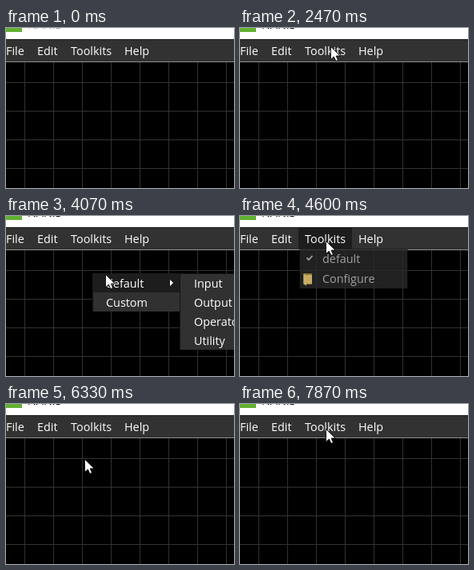
An HTML page with a canvas for the animation above (8.79 s loop, 285 by 201 pixels).

```html
<!DOCTYPE html>
<html lang="en">
<head>
<meta charset="utf-8">
<title>Toolkit menus</title>
<style>
html, body { margin: 0; width: 100%; height: 100%; overflow: hidden; background: #000; }
canvas { display: block; }
</style>
</head>
<body>
<canvas id="stage" width="285" height="201"></canvas>
<script>
const ctx = document.getElementById('stage').getContext('2d');
const LOOP = 8790, FPS = 15;   // all times below are ticks of 1/15 s
const PANEL = '#313131', DARK = '#1d1d1d', EDGE = '#141414';

const during = (n, spans) => spans.some(([from, to]) => n >= from && n < to);

// Each menu is shown during its open spans and fades in over about four ticks
const toolkits = {
  x: 74, y: 41, w: 136, rowH: 25, indent: 29,
  labels: ['default', 'Configure'],
  open: [[18, 37], [68, 81], [101, 118]],
  extra(n) {
    drawFolder();
    if (!during(n, [[78, 112]])) drawCheck();
  }
};
const context = {
  x: 108, y: 72, w: 112, rowH: 24, indent: 17,
  labels: ['default', 'Custom'],
  open: [[44, 67]],
  extra: () => shape([[205, 80], [209, 84], [205, 88]], '#fff')
};
const submenu = {
  ...context, x: 217, w: 80, indent: 18,
  labels: ['Input', 'Output', 'Operators', 'Utility'],
  open: [[54, 67]],
  extra: null
};
const shortContext = {
  ...context, x: 81, y: 85, w: 103,
  labels: ['Custom'],
  open: [[84, 95]],
  extra: null
};
const MENUS = [toolkits, context, submenu, shortContext];

const ENTRY = [251, 167], LABEL = [107, 31], DEFAULT_ROW = [107, 47];
const MOVES = [
  { from: 6, to: 11, at: [113, 23] },
  { from: 39, to: 43, at: [context.x, context.y] },
  { from: 47, to: 50, at: [128, 84] },
  { from: 60, to: 65, at: LABEL },
  { from: 70, to: 73, at: DEFAULT_ROW },
  { from: 78, to: 80, at: LABEL },
  { from: 81, to: 83, at: [81, 84] },
  { from: 87, to: 90, at: [94, 95] },
  { from: 93, to: 98, at: [103, 29] },
  { from: 105, to: 107, at: DEFAULT_ROW },
  { from: 112, to: 115, at: LABEL }
];

function pointerAt(n) {
  let pos = ENTRY;
  for (const { from, to, at } of MOVES) {
    const k = Math.min(1, Math.max(0, (n - from) / (to - from)));
    pos = pos.map((v, i) => v + (at[i] - v) * k);
  }
  return pos.map(Math.round);
}

function rect(x, y, w, h, color) {
  ctx.fillStyle = color;
  ctx.fillRect(x, y, w, h);
}

function text(str, x, y, color = '#fff') {
  ctx.fillStyle = color;
  ctx.fillText(str, x, y);
}

function shape(points, color) {
  ctx.beginPath();
  points.forEach(([x, y]) => ctx.lineTo(x, y));
  ctx.closePath();
  ctx.fillStyle = color;
  ctx.fill();
}

function drawPointer([x, y]) {
  ctx.save();
  ctx.translate(x + 0.5, y + 0.5);
  shape([[0, 0], [0, 16], [3.8, 12.6], [6.4, 18], [9, 17], [6.6, 11.6], [11.6, 11.4]], '#fff');
  ctx.strokeStyle = '#000';
  ctx.lineWidth = 0.8;
  ctx.stroke();
  ctx.restore();
}

function drawFolder() {
  rect(80, 72, 10, 14, '#d9b04c');
  rect(83, 74, 7, 11, '#f4d77e');
  shape([[79, 72], [83, 75], [83, 88], [79, 85]], '#f7dc8c');
}

function drawCheck() {
  ctx.strokeStyle = '#fff';
  ctx.lineWidth = 1.8;
  ctx.beginPath();
  ctx.moveTo(83.5, 52.5);
  ctx.lineTo(86, 55);
  ctx.lineTo(90.5, 50);
  ctx.stroke();
}

function drawWindow(n, lit) {
  rect(0, 0, 285, 201, '#000');
  for (let x = 23; x < 285; x += 36) rect(x, 43, 1, 158, '#323232');
  for (let y = 68; y < 201; y += 36) rect(0, y, 285, 1, '#323232');

  rect(0, 0, 285, 14, '#fff');
  rect(0, 0, 20, 5, '#62b132');
  text('NANIS', 27, 1, n < 18 ? '#999' : '#000');

  rect(0, 14, 285, 28, '#323232');
  rect(0, 14, 285, 1, '#191919');
  rect(0, 42, 285, 1, '#909090');
  if (lit) rect(73, 15, 67, 26, DARK);
  text('File', 0, 34);
  text('Edit', 39, 34);
  text('Toolkits', 81, 34);
  text('Help', 148, 34);
}

function drawMenu(menu, n, [px, py]) {
  const span = menu.open.find(s => during(n, [s]));
  if (!span) return;
  const { x, y, w, rowH, labels, indent, extra } = menu;
  const h = rowH * labels.length;
  ctx.globalAlpha = Math.min(1, (n - span[0] + 1) / 3.5);
  rect(x, y, w, h, EDGE);
  rect(x + 1, y + 1, w - 2, h - 1, PANEL);
  labels.forEach((label, i) => {
    const top = y + i * rowH;
    const hovered = px > x && px < x + w && py > top && py <= top + rowH;
    if (hovered) rect(x, top, w, rowH, DARK);
    text(label, x + indent, Math.round(top + rowH / 2 + 5.5));
  });
  if (extra) extra(n);
  ctx.globalAlpha = 1;
}

function draw(n) {
  const pointer = pointerAt(n), [px, py] = pointer;
  const overLabel = n >= 6 && px > 73 && px < 140 && py < 41;
  // The label stays plain under an open popup and right after a closing click
  const plain = during(n, [...context.open, [37, 40], [118, Infinity]]);
  drawWindow(n, during(n, toolkits.open) || overLabel && !plain);
  MENUS.forEach(menu => drawMenu(menu, n, pointer));
  if (n >= 6) drawPointer(pointer);
}

function tick(now) {
  ctx.font = '14.4px "Open Sans", "Noto Sans", sans-serif';
  draw(Math.floor((now % LOOP + 4) * FPS / 1000));
  requestAnimationFrame(tick);
}
requestAnimationFrame(tick);
</script>
</body>
</html>
```
